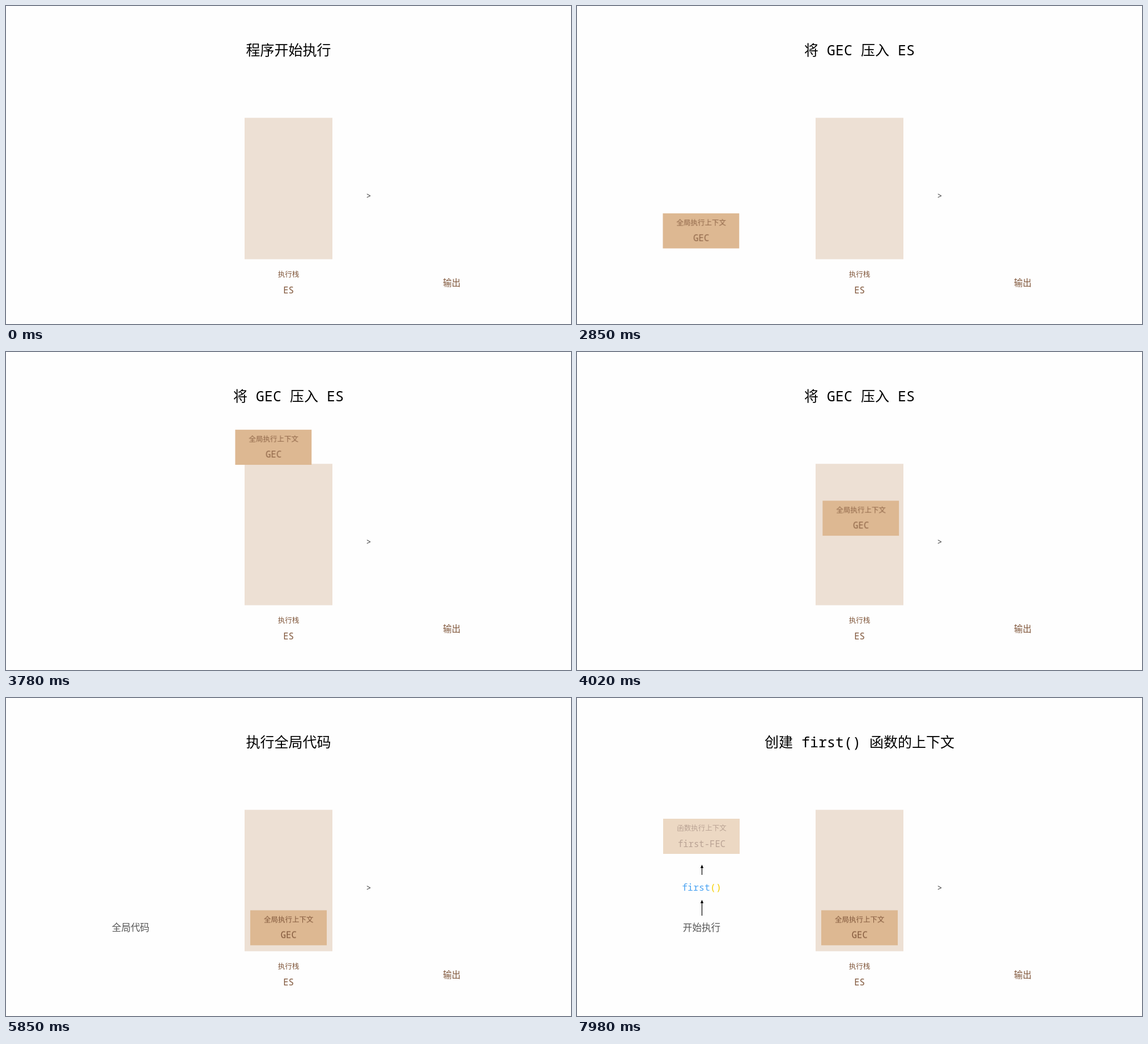
Write an HTML page that moves like this. It is 997 px wide and 561 px high and loops after 8000 ms.

```html
<!DOCTYPE html>
<html lang="zh-CN">
<head>
<meta charset="utf-8">
<title>执行栈</title>
<style>
  html, body { margin: 0; width: 100%; height: 100%; overflow: hidden; background: #fefefe; }
  svg { position: absolute; left: 0; top: 0; display: block; }
  text {
    font-family: "Noto Sans Mono", "Noto Sans CJK SC", "Noto Sans CJK", monospace;
    text-anchor: middle;
    fill: #7f5539;
  }
  .title text { font-size: 25px; font-weight: 500; fill: #000; }
  .small { font-size: 12.5px; }
  .mid { font-size: 15.6px; }
  .label { font-size: 16.6px; fill: #555; }
  .box { fill: #ddb892; }
  .arrow { stroke: #000; stroke-width: 1.2; }

  /* 1% of the loop is 80 ms */
  .title g, .anim { animation: 8s infinite cubic-bezier(.37, 0, .63, 1); }
  .title g { animation-name: titles; animation-timing-function: step-end; }
  #gec {
    position: absolute; left: 0; top: 0; width: 0; height: 0;
    offset-path: path("M152 374 C142 225 182 100 320 100 C428 100 441 190 431 374.5");
    offset-rotate: 0deg;
    animation-name: gec-in, gec-move;
  }
  #gec svg { overflow: visible; }
  #gec .ink { animation-name: ink; animation-timing-function: step-end; }
  .global { animation-name: global; }
  .start { animation-name: start; }
  .arrow1 { animation-name: arrow1; }
  .call { animation-name: call; }
  .arrow2 { animation-name: arrow2; }
  .fec { animation-name: fec; }

  @keyframes titles {
    0% { transform: translateY(0); }
    17.25% { transform: translateY(-100px); }
    34.125% { transform: translateY(-200px); }
    56.625% { transform: translateY(-300px); }
    73.5% { transform: translateY(-400px); }
    93%, 100% { transform: translateY(-500px); }
  }
  @keyframes gec-in { 0%, 18.75% { opacity: 0; } 31.6%, 100% { opacity: 1; } }
  @keyframes gec-move { 0%, 34.125% { offset-distance: 0%; } 56%, 100% { offset-distance: 100%; } }
  @keyframes ink { 0% { opacity: .85; } 56.625%, 100% { opacity: 1; } }
  @keyframes global {
    0%, 59% { opacity: 0; }
    71.5%, 81.9% { opacity: 1; }
    92.5%, 100% { opacity: 0; }
  }
  @keyframes start { 0%, 81.9% { opacity: 0; } 92.5%, 100% { opacity: 1; } }
  @keyframes arrow1 { 0%, 73.1% { opacity: 0; } 82%, 100% { opacity: 1; } }
  @keyframes call { 0%, 75% { opacity: 0; } 88%, 100% { opacity: 1; } }
  @keyframes arrow2 { 0%, 93% { opacity: 0; } 98.5%, 100% { opacity: 1; } }
  /* the loop cuts this fade a little past its middle */
  @keyframes fec {
    0%, 93% { opacity: 0; animation-timing-function: cubic-bezier(.4, 0, .75, .75); }
    100% { opacity: .56; }
  }
</style>
</head>
<body>
<svg width="997" height="561" viewBox="0 0 997 561">
  <svg class="title" x="0" y="40" width="997" height="80" overflow="hidden">
    <g>
      <text x="498.5" y="47">程序开始执行</text>
      <text x="498.5" y="147">创建全局执行上下文</text>
      <text x="498.5" y="247">将 GEC 压入 ES</text>
      <text x="498.5" y="347">执行全局代码</text>
      <text x="498.5" y="447">调用 first()</text>
      <text x="498.5" y="547">创建 first() 函数的上下文</text>
    </g>
  </svg>

  <rect x="421" y="197.3" width="155" height="249.4" fill="#ede0d4"/>
  <text class="small" x="498.5" y="478">执行栈</text>
  <text class="mid" x="498.5" y="506.5">ES</text>
  <text class="mid" x="786.5" y="494.3">输出</text>
  <text x="640" y="340" font-size="15" style="fill:#444">&gt;</text>

  <text class="label anim global" x="220" y="411.3">全局代码</text>
  <text class="label anim start" x="220" y="411.3">开始执行</text>

  <g class="anim arrow1">
    <path class="arrow" d="M220.5 384V360"/>
    <path d="M220.5 356l2.6 6h-5.2z"/>
  </g>
  <text class="label anim call" x="220" y="340"><tspan fill="#4ba3f2">first</tspan><tspan fill="#f5d000">()</tspan></text>
  <g class="anim arrow2">
    <path class="arrow" d="M220.5 312V298"/>
    <path d="M220.5 294l2.6 6h-5.2z"/>
  </g>

  <g class="anim fec">
    <rect class="box" x="152" y="213" width="135" height="62"/>
    <text class="small" x="220" y="234">函数执行上下文</text>
    <text class="mid" x="220" y="262.5">first-FEC</text>
  </g>
</svg>

<div id="gec" class="anim">
  <svg width="135" height="62">
    <rect class="box" width="135" height="62"/>
    <g class="anim ink">
      <text class="small" x="67.8" y="21">全局执行上下文</text>
      <text class="mid" x="67.8" y="49.4">GEC</text>
    </g>
  </svg>
</div>
</body>
</html>
```
